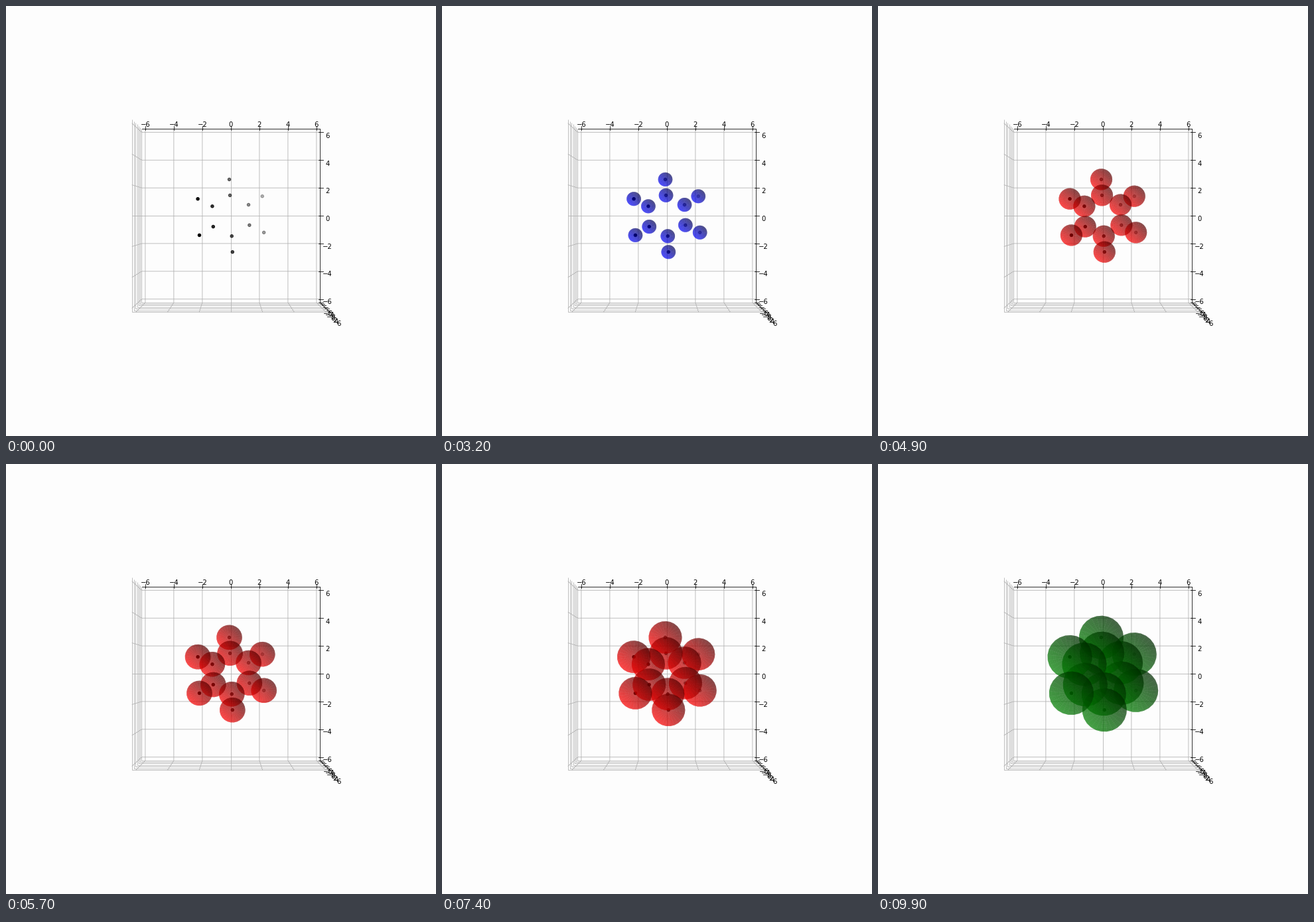
These frames come from a looping animation (648 by 648 pixels, 10000 ms). A matplotlib script:

```python
import numpy as np
import matplotlib.pyplot as plt
from matplotlib.animation import FuncAnimation
from matplotlib.collections import LineCollection, QuadMesh
from matplotlib.colors import to_rgb

SIZE, DPI = 648, 72
FRAMES, INTERVAL = 100, 100
SPAN, EDGE = 12, 6.25           # data range and padded half box
TICKS = range(-6, 7, 2)
LABEL_GAP = 0.557
GROWTH = 0.015                  # radius added per frame
ALPHA = 0.5
BOND, CH_REACH = 1.395, 2.483   # distances of C and H from the centre

# Viewport of the top view, in pixels from the lower left
LEFT, BOTTOM, WIDTH, HEIGHT = 81, 80.75, 502.2, 489.24
CX = LEFT + WIDTH * 0.95 / 1.85
CY = SIZE - BOTTOM - HEIGHT * 0.95 / 1.85
SX, SY = WIDTH * 10 / 1.85, HEIGHT * 10 / 1.85


def project(x, y, z):
    """Perspective view from straight above, z towards the eye."""
    depth = SPAN * 10 - np.asarray(z, float)
    return CX + SX * np.asarray(x) / depth, CY - SY * np.asarray(y) / depth


def path(*points):
    return [project(*p) for p in points]


fig = plt.figure(figsize=(SIZE / DPI, SIZE / DPI), dpi=DPI, facecolor="#fdfdfd")
ax = fig.add_axes([0, 0, 1, 1])
ax.set(xlim=(0, SIZE), ylim=(SIZE, 0))
ax.axis("off")

# Box: grid on the three far panes, axis lines, ticks and labels
E = EDGE
grid, axes = [], [
    path((-E, E, -E), (E, E, -E)),
    path((E, -E, -E), (E, E, -E)),
    path((E, -E, -E), (E, -E, E)),
]
for t in TICKS:
    grid += [
        path((t, E, -E), (t, -E, -E), (t, -E, E)),
        path((E, t, -E), (-E, t, -E), (-E, t, E)),
        path((-E, E, t), (-E, -E, t), (E, -E, t)),
    ]
    axes += [
        path((t, E - 0.1, -E), (t, E + 0.2, -E)),
        path((E - 0.1, t, -E), (E + 0.2, t, -E)),
        path((E - 0.1, -E, t), (E + 0.2, -E, t)),
    ]
    out = E + LABEL_GAP
    for spot in ((t, out, -out), (out, t, -out), (out, -out, t)):
        ax.text(*project(*spot), str(t).replace("-", "\u2212"), fontsize=10,
                family="DejaVu Sans", ha="center", va="top", zorder=2)
ax.add_collection(LineCollection(grid, colors="#b0b0b0", linewidths=0.8, zorder=1),
                  autolim=False)
ax.add_collection(LineCollection(axes, colors="black", linewidths=0.8,
                                 capstyle="projecting", zorder=1.5),
                  autolim=False)

# Ring of six carbons and six hydrogens, slightly tilted
angle = np.tile(np.radians(92.44 + 60 * np.arange(6)), 2)
reach = np.repeat([BOND, CH_REACH], 6)
atom_x, atom_y = reach * np.cos(angle), reach * np.sin(angle)
atom_z = 0.05 * reach * np.cos(angle - np.radians(195))
atoms = sorted(zip(atom_x, atom_y, atom_z), key=lambda p: p[2])

near = (atom_z - atom_z.min()) / np.ptp(atom_z)
dots = np.zeros((12, 4))
dots[:, 3] = 0.3 + 0.7 * near
ax.scatter(*project(atom_x, atom_y, atom_z), s=20, c=dots, zorder=3)

# Unit sphere, rows running from the far pole to the near one
steps = np.r_[0:99:4, 99] / 99
U, V = np.meshgrid(2 * np.pi * steps, np.pi * steps[::-1])


def sphere(u, v):
    return np.array([np.cos(u) * np.sin(v), np.sin(u) * np.sin(v), np.cos(v)])


def middle(a):
    return (a[:-1, :-1] + a[1:, 1:]) / 2


UNIT = sphere(U, V)
LIGHT = np.array([-2, -2, 1]) / 3
SHADE = 0.3 + 0.35 * (1 + np.tensordot(LIGHT, sphere(middle(U), middle(V)), 1)).ravel()


def shaded(color):
    rgba = np.full((SHADE.size, 4), ALPHA)
    rgba[:, :3] = SHADE[:, None] * to_rgb(color)
    return rgba


BLUE, RED, GREEN = (shaded(c) for c in "brg")


def skin_for(r):
    """Red once neighbouring carbons touch, green once every second one does."""
    if 2 * r < BOND:
        return BLUE
    return RED if 2 * r < BOND * np.sqrt(3) else GREEN


meshes = []


def clear():
    while meshes:
        meshes.pop().remove()
    return []


def draw(i):
    clear()
    if i == 0:
        return []
    r = GROWTH * i
    skin = skin_for(r)
    for x, y, z in atoms:
        px, py, pz = r * UNIT
        corners = np.stack(project(x + px, y + py, z + pz), axis=-1)
        mesh = QuadMesh(corners, antialiased=True, facecolors=skin,
                        edgecolors="none", linewidths=0, zorder=4)
        ax.add_collection(mesh, autolim=False)
        meshes.append(mesh)
    return meshes


anim = FuncAnimation(fig, draw, frames=FRAMES, interval=INTERVAL,
                     init_func=clear, repeat=True, repeat_delay=0)
plt.show()
```
